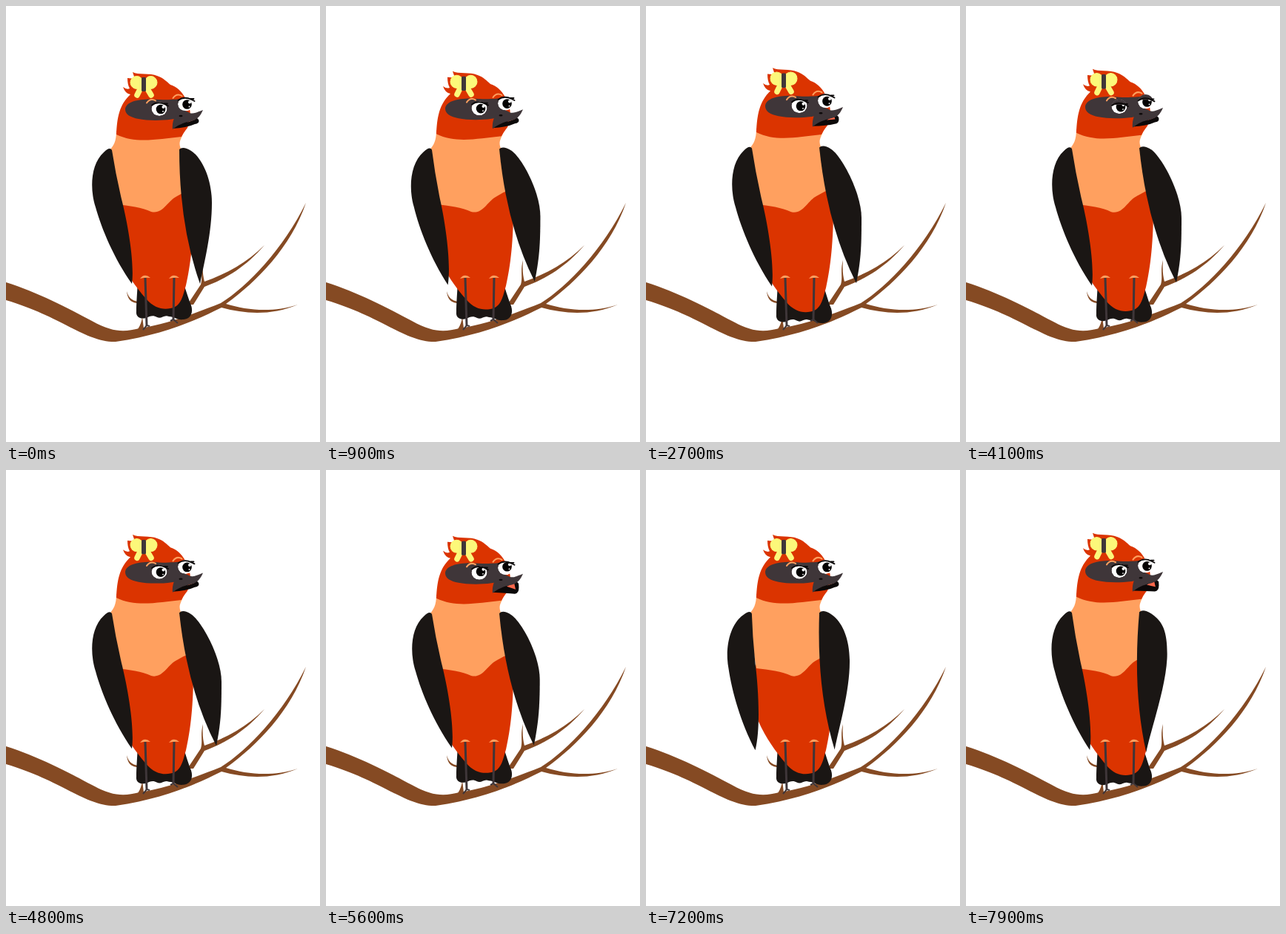
These frames come from a looping animation (424x587 px, 8000 ms). An HTML page:

```html
<!DOCTYPE html>
<html lang="en">
<head>
<meta charset="utf-8">
<title>Bird on a branch</title>
<style>
html, body { margin: 0; width: 100%; height: 100%; overflow: hidden; background: #fff; }
svg { display: block; width: 100%; height: 100%; }
.red { fill: #db3400; }
.peach { fill: #ffa05f; }
.black { fill: #1a1614; }
.grey { fill: #3f3639; }
.yellow { fill: #fcf87a; stroke: #fcf87a; }
.line { fill: none; stroke: #3f3639; stroke-width: 3; }
.arc { fill: none; stroke: #ffa05f; stroke-width: 2; stroke-linecap: round; }
.lash { fill: none; stroke: #0c0909; stroke-width: 1.8; stroke-linecap: round; }
</style>
</head>
<body>
<svg viewBox="0 0 424 587">
  <defs><clipPath id="socket"><ellipse rx="10.5" ry="9.5"/></clipPath></defs>

  <g id="branch" fill="#854a23">
    <path d="M0 372C42 385 84 407 116 424C145 440 160 439 180 434C216 429 257 413 290 400C326 378 375 326 405 265C385 324 339 371 297 401C326 410 361 413 394 402C358 417 324 415 291 406C253 425 210 443 148 452C108 453 75 418 0 396Z"/>
    <path d="M245 402L263 375C266 365 262 357 266 342C265 356 266 363 268 371C297 361 326 345 349 322C325 350 298 367 268 378L253 402Z"/>
    <path d="M163 384C166 394 170 396 178 398L177 400C168 399 164 394 163 384ZM184 418Q183 428 178 435L186 434Z"/>
  </g>

  <g id="bird">
    <path class="black" d="M178 370C177 388 176 400 176 411C175 419 182 422 189 420C195 417 199 416 204 419C210 422 213 415 220 418C228 418 229 423 240 422C250 421 253 412 250 403C246 393 244 386 240 374Z"/>
    <path class="red" d="M148 262C146 300 148 325 152 338C162 360 175 378 189 394C200 407 212 409 222 407C237 405 239 389 243 376C250 345 254 310 253 246Z"/>
    <path class="peach" d="M149 168C149 183 145 188 141 193C142 220 145 245 149 267C166 269 184 271 196 277C212 281 218 262 231 256Q241 250 250 247L236 192C233 184 235 182 239 172Z"/>
    <path id="leftWing" class="black" d="M143 194Q140 189 132 197C114 213 113 247 121 271C129 300 146 340 170 374C174 343 163 287 156 260Q148 226 143 194Z"/>
    <path id="rightWing" class="black"/>

    <path class="red" d="M149 173C150 150 153 133 168 119Q161 118 158 109Q163 113 167 111Q164 106 164 97L174 98L171 89C178 93 195 90 204 94C213 97 217 102 222 106C231 109 237 115 241 122C249 135 252 149 245 164C241 169 239 172 237 176C205 179 176 186 149 173Z"/>
    <path class="grey" d="M161 139C162 127 185 124 207 126C222 127 232 125 241 125L243 148C224 155 194 155 179 152C168 150 161 146 161 139Z"/>
    <g id="eyes"></g>
    <path id="jaw" fill="#0c0909"/>
    <path id="mouth" fill="#ff684c"/>
    <path class="grey" d="M229 147C232 138 242 140 248 144C254 146 260 142 266 140C262 149 258 153 250 155C239 157 231 161 225 166C224 160 226 152 229 147Z"/>
    <ellipse cx="236" cy="148" rx="2.5" ry="1.2" fill="#0c0909"/>

    <g class="yellow">
      <circle cx="176.5" cy="103" r="8.5"/>
      <circle cx="195.5" cy="103" r="8.5"/>
      <path d="M182 110L177 120M190 110L196 120" stroke-width="7.5" stroke-linecap="round"/>
    </g>
    <rect class="grey" x="183" y="96" width="6" height="19" rx="1.5"/>
  </g>

  <path class="line" d="M188 366L190 431M227 366L226 423"/>
  <path class="line" style="stroke-width:2" d="M185 436L190 430L194 431M222 424L226 422L232 427"/>
  <path class="peach" d="M181 367Q187 359 195 366Q188 365 181 367ZM220 367Q226 359 234 366Q227 365 220 367Z"/>
</svg>
<script>
const $ = id => document.getElementById(id);
const LOOP = 8000, STEP = 100;

const eye = (x, y) => `<g transform="translate(${x} ${y})">
  <g clip-path="url(#socket)">
    <ellipse rx="10.5" ry="9.5" fill="#fff"/>
    <g class="pupil">
      <circle r="6.3" fill="#050303"/>
      <circle cx="3.5" cy="-3" r="2" fill="#fff"/>
      <circle cx="3" cy="3" r="0.9" fill="#fff"/>
    </g>
    <rect class="lid grey" x="-12" y="-30" width="24" height="20"/>
  </g>
  <path class="lash" d="M-10 -5Q-2 -11 8 -6L12 -4M7 -7L11 -7"/>
  <path class="arc" d="M-17 -8Q-12 -15 -5 -11"/>
</g>`;
$('eyes').innerHTML = eye(207, 138.5) + eye(242.5, 132);

const scaleY = (y, s) => `translate(0 ${y * (1 - s)}) scale(1 ${s})`;
const setAll = (selector, value) =>
  document.querySelectorAll(selector).forEach(el => el.setAttribute('transform', value));

// spread: 0 at rest, 1 held out, negative folded in
function rightWing(spread) {
  const tip = 262 + 22 * spread;
  const edge = 278 + 10 * spread + 3 * spread ** 2;
  const bend = 265 + 20 * spread;
  const end = 374 - 4 * spread;
  return `M234 193Q239 188 250 195C264 204 ${edge} ${bend - 33} ${edge} ${bend}` +
    `C${edge} ${bend + 40} ${tip + 6} ${end - 30} ${tip} ${end}` +
    `Q${(tip + 234) / 2 - 14} 296 234 193Z`;
}

function draw(now) {
  const t = Math.floor(now % LOOP / STEP) * STEP;
  const ramp = (from, to) => Math.min(1, Math.max(0, (t - from) / (to - from)));
  const pulse = (from, peak, to) => ramp(from, peak) - ramp(peak, to);

  const breath = 1 + 0.0165 * (1 - Math.cos(2 * Math.PI * t / 6000));
  const shrug = pulse(650, 1750, 2650) + pulse(6000, 7150, 8000);
  const spread = ramp(0, 1000) - 1.85 * ramp(5400, 7900);
  const blink = pulse(1400, 1700, 1900) + pulse(3900, 4100, 4300);
  const open = pulse(2500, 3000, 3500) + pulse(5100, 5600, 6800) + pulse(7300, 8000, 8700);
  const drop = 8 * open;

  $('branch').setAttribute('transform', scaleY(372, 1 + 0.087 * pulse(5600, 6100, 6800)));
  $('bird').setAttribute('transform', scaleY(268, breath));
  $('leftWing').setAttribute('transform', `rotate(${7.5 * shrug} 142 193)`);
  $('rightWing').setAttribute('d', rightWing(spread));
  $('jaw').setAttribute('d', `M225 165Q244 ${164 + drop / 4} 255 ${159 + drop}Q262 ${158 + drop} 260 153L256 149L240 154Z`);
  $('mouth').setAttribute('d', `M244 157L254 152L${255 + open} ${153 + drop}Q250 ${155 + drop / 2} 244 157Z`);
  setAll('.pupil', `translate(2 ${0.5 - 3 * pulse(4800, 6000, 7200)})`);
  setAll('.lid', `translate(0 ${7.6 * blink})`);
  setAll('.lash', `translate(0 ${3.6 * blink})`);
  requestAnimationFrame(draw);
}
requestAnimationFrame(draw);
</script>
</body>
</html>
```
